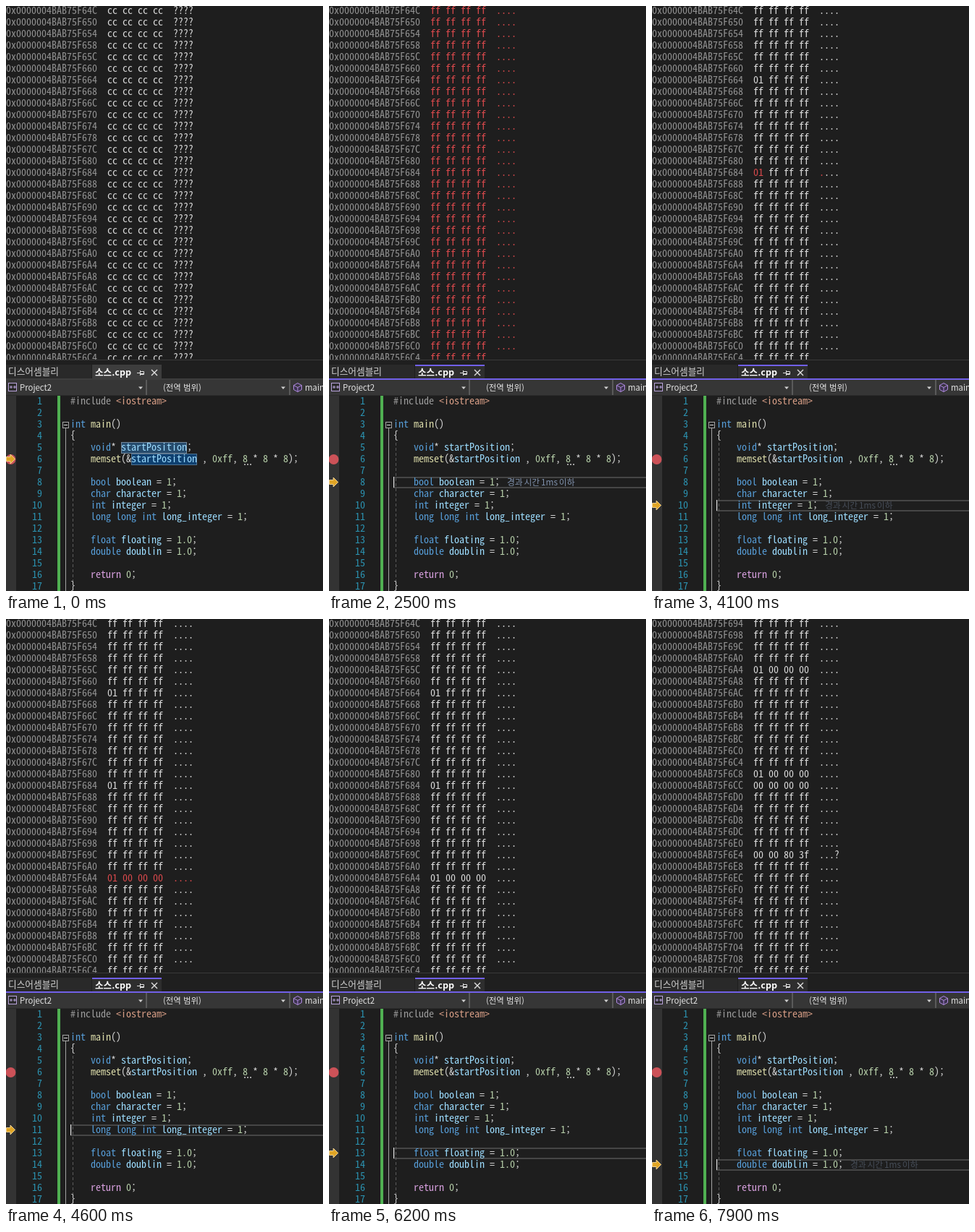
An HTML page that plays this animation: 438x809 px, repeating every 8000 ms.

```html
<!DOCTYPE html>
<html lang="ko">
<head>
<meta charset="utf-8">
<style>
  html, body { margin: 0; width: 100%; height: 100%; overflow: hidden; background: #1e1e1e; }
  svg { display: block; width: 438px; height: 809px; }
  text { white-space: pre; }
  .mono { font-family: "Noto Sans Mono CJK KR", "Liberation Mono", monospace; }
  .ui { font-family: "Noto Sans CJK KR", "Noto Sans", sans-serif; font-size: 11.4px; fill: #e4e4e4; }
</style>
</head>
<body>
<svg id="stage" viewBox="0 0 438 809"></svg>
<script>
const stage = document.getElementById('stage');
const LOOP = 8000, CHAR = 7, ROW = 16, LEFT = 89;
const RED = '#d8494c';

const code = [
  '#include <iostream>', '', 'int main()', '{',
  '    void* startPosition;',
  '    memset(&startPosition , 0xff, 8 * 8 * 8);', '',
  '    bool boolean = 1;',
  '    char character = 1;',
  '    int integer = 1;',
  '    long long int long_integer = 1;', '',
  '    float floating = 1.0;',
  '    double doublin = 1.0;', '',
  '    return 0;', '}'
];

// start time, line, caret blink start
const steps = [
  [0, 6, 0], [1500, 8, 1500], [2800, 9, 2800], [3800, 10, 3800],
  [4600, 11, 4600], [6200, 13, 6100], [7600, 14, 7600]
];
// line reached, address, bytes, line at which they show red
const writes = [
  [9, 0x664, '01 ff ff ff', 9],
  [10, 0x684, '01 ff ff ff', 10],
  [11, 0x6a4, '01 00 00 00', 11],
  [13, 0x6c8, '01 00 00 00', 14],
  [13, 0x6cc, '00 00 00 00', 14],
  [14, 0x6e4, '00 00 80 3f', 14]
];
const scrolls = [6500, 6600, 6700, 7100, 7400, 7900];

// Size at which one monospaced character is exactly CHAR wide
const pen = document.createElement('canvas').getContext('2d');
pen.font = '100px "Noto Sans Mono CJK KR", "Liberation Mono", monospace';
const monoSize = CHAR * 100 / pen.measureText('0').width;

const esc = s => s.replace(/&/g, '&amp;').replace(/</g, '&lt;');
const rect = (x, y, w, h, fill, extra = '') =>
  `<rect x="${x}" y="${y}" width="${w}" height="${h}" fill="${fill}" ${extra}/>`;
const path = (d, fill, extra = '') => `<path d="${d}" fill="${fill}" ${extra}/>`;
const mono = (x, y, s, fill) =>
  `<text class="mono" font-size="${monoSize}" x="${x}" y="${y}" fill="${fill}">${esc(s)}</text>`;
const ui = (x, y, s, extra = '') => `<text class="ui" x="${x}" y="${y}" ${extra}>${s}</text>`;
const rowTop = n => 523 + ROW * n;

function memory(t, line) {
  const top = 0x64c + 12 * scrolls.filter(s => t >= s).length;
  const fresh = t < 7900;
  let out = '';
  for (let i = 0; i < 31; i++) {
    const addr = top + 4 * i, y = 11 + ROW * i;
    const hit = writes.find(w => w[1] === addr && line >= w[0]);
    const bytes = (hit ? hit[2] : line < 8 ? 'cc cc cc cc' : 'ff ff ff ff').split(' ');
    const color = b => {
      const lit = line === 8 || (hit && hit[3] === line && b !== 'ff');
      return lit && fresh ? RED : '#dadada';
    };
    out += mono(0, y, '0x0000004BAB75F' + addr.toString(16).toUpperCase(), '#929292');
    bytes.forEach((b, k) => {
      out += mono(140 + 21 * k, y, b, color(b)) +
        mono(231 + CHAR * k, y, b === 'cc' || b === '3f' ? '?' : '.', color(b));
    });
  }
  return out;
}

function tabs(focus) {
  const accent = focus ? '#7160e8' : '#3d3d3d';
  return rect(0, 489, 438, 28, '#1f1f1f') + rect(0, 489, 438, 1, '#3a3a3a') +
    rect(0, 496, 118, 19, '#292929') +
    rect(119, 496, 96, 20, focus ? '#2e2e2e' : '#3d3d3d') +
    rect(119, 496, 96, 2, accent) + rect(0, 515, 438, 2, accent) +
    ui(3, 509.5, '디스어셈블리', 'style="font-size:12.7px;fill:#d0d0d0"') +
    ui(123, 510.5, '소스.cpp', 'style="font-size:12.6px;font-weight:700;fill:#fafafa"') +
    path('M181 507.5h4M185.5 504v7M186 505.5h4.500v4h-4.500M186 508.500h4.500', 'none', 'stroke="#e0e0e0"') +
    path('M201 503l8 8M209 503l-8 8', 'none', 'stroke="#e0e0e0" stroke-width="1.4"');
}

function navBar() {
  const arrow = x => path(`M${x - 3} 526.500h6l-3 3.500z`, '#d0d0d0');
  const divider = x => rect(x, 517, 2, 21, '#5a5a5a');
  return rect(0, 517, 438, 22, '#2b2b2b') + rect(0, 517, 438, 21, '#363636') +
    divider(193) + divider(391) +
    rect(3.5, 521.5, 11, 11, '#2b2b2b', 'stroke="#b9a4dc"') +
    path('M5 527h4M7 525v4M10 527h4M12 525v4', 'none', 'stroke="#b9a4dc"') +
    ui(19, 531.5, 'Project2') + arrow(186) +
    ui(217, 531.5, '(전역 범위)') + arrow(383) +
    path('M403 521.500l5.500 3v6l-5.500 3l-5.500-3v-6zM397.500 524.500l5.500 3l5.500-3M403 527.500v6',
      '#3c3350', 'stroke="#b18be0"') +
    ui(413, 531.5, 'main');
}

function tokenColor(s) {
  if (s === '#include') return '#9b9b9b';
  if (/^<\w/.test(s)) return '#d69d85';
  if (/^(int|void|bool|char|long|float|double)$/.test(s)) return '#569cd6';
  if (s === 'return') return '#d8a0df';
  if (/^\d/.test(s)) return '#b5cea8';
  if (/^(main|memset)$/.test(s)) return '#dcdcaa';
  return /^\w/.test(s) ? '#9cdcfe' : '#d4d4d4';
}

function listing() {
  let out = '';
  code.forEach((src, i) => {
    const y = rowTop(i + 1) + 12, num = String(i + 1);
    out += mono(50 - CHAR * num.length, y, num, '#2b91af');
    for (const m of src.matchAll(/#include|<\w+>|\w[\w.]*|[^\s\w]+/g))
      out += mono(LEFT + CHAR * m.index, y, m[0], tokenColor(m[0]));
  });
  return out;
}

const frame = rect(0, 539, 14, 270, '#333333') + rect(71, 539, 4, 270, '#50b052') +
  path('M82.500 584V809', 'none', 'stroke="#a5a5a5"') +
  rect(78.5, 575.5, 8, 8, '#1e1e1e', 'stroke="#a5a5a5"') +
  path('M80 579.500h5', 'none', 'stroke="#dcdcdc"') +
  path('M92.500 604V795', 'none', 'stroke="#5c5c5c" stroke-dasharray="4 3"');
const dots = [329, 333, 337].map(x => rect(x, 633, 2, 2, '#a0a0a0')).join('');
const statics = navBar(), text = listing();

function editor(t, [start, line, blink]) {
  const since = t - start, running = line > 6;
  const current = running ? line : t >= 1100 ? 4 : 0;
  const top = rowTop(current);
  let out = rect(0, 539, 438, 270, '#1e1e1e');
  if (current) out += rect(90, top + 1, 360, 14, 'none', 'stroke="#464646" stroke-width="2"');
  if (t < 1200) {
    out += rect(159.5, rowTop(5) + .5, 90, 15, '#264b6c', 'stroke="#74879a"') +
      rect(173.5, rowTop(6) + .5, 90, 15, '#0e4070', 'stroke="#4d708e"');
  }
  out += frame + text + dots;

  if (t >= 700 && t < 2400)
    out += path('M102.500 591.500l5.500 3.500l-5.500 3.500z', '#2f7a35', 'stroke="#3d8f43"') +
      rect(109, 591, 2, 8, '#3d8f43');

  if (current && Math.floor((t - blink) / 500) % 2 === 0 || current === 4)
    out += rect(running ? 89 : 97, top, 1, 15, '#e6e6e6');

  if (running && since >= 300) {
    const fade = Math.min(1, .4 + .3 * Math.floor((since - 300) / 100));
    out += ui(LEFT + CHAR * code[line - 1].length + 10, top + 12, '경과 시간 1ms 이하',
      `style="font-size:11.8px;word-spacing:-1.5px;fill:#8092ad" opacity="${fade}"`);
  }

  const y = rowTop(line) + 7.5;
  return out + `<circle cx="6.500" cy="627" r="6.900" fill="#cc5258"/>` +
    path(`M.5 ${y - 3}h5.500v-3.500l6.500 6.500l-6.500 6.500v-3.500h-5.500z`, '#e0a526',
      'stroke="#ecd093"');
}

function draw(t) {
  const step = steps.filter(s => t >= s[0]).pop();
  return rect(0, 0, 438, 489, '#1e1e1e') + memory(t, step[1]) +
    editor(t, step) + tabs(t >= 1100) + statics;
}

const origin = performance.now();
let shown = '';
function tick() {
  const next = draw((performance.now() - origin) % LOOP);
  if (next !== shown) stage.innerHTML = shown = next;
  requestAnimationFrame(tick);
}
tick();
</script>
</body>
</html>
```
